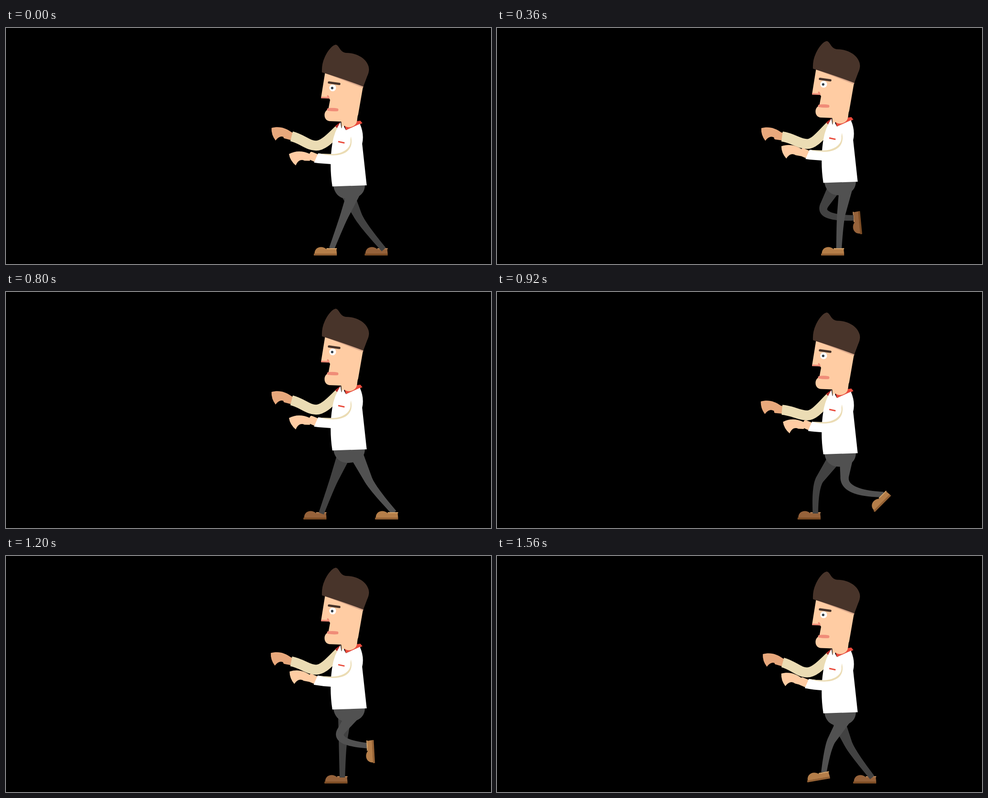
Animation, 1073 px wide and 522 px high, one loop 1.6 s. Source, as an HTML page:

```html
<!DOCTYPE html>
<html lang="en">
<head>
<meta charset="utf-8">
<title>Walking man</title>
<style>
html, body { margin: 0; width: 100%; height: 100%; overflow: hidden; background: #000; }
svg { display: block; width: 100%; height: 100%; }
</style>
</head>
<body>
<svg viewBox="0 0 1073 522">
  <defs>
    <path id="hand" d="M0,0C16,-4 30,-1 45,10L42,25L30,22C22,16 15,20 9,28Q-1,15 0,0Z"/>
    <path id="shoe" d="M-38,11.500C-38,-5 -20,-7 -12,1L10.500,1L11.500,11.500Z"/>
    <rect id="sole" x="-39.500" y="11" width="51" height="4.200"/>
    <rect id="trim" x="-11.500" y="-1" width="23" height="2.200"/>
  </defs>

  <g id="farArm" fill="#e8a87c">
    <use id="farHand" href="#hand"/>
    <rect id="farWrist" x="-17" y="-8.500" width="20" height="17" rx="3"/>
    <path id="farSleeve" fill="none" stroke="#ebdcb4" stroke-width="22"/>
  </g>

  <g id="farFoot">
    <use href="#shoe" fill="#96623a"/>
    <use href="#sole" fill="#7d4d25"/>
    <use href="#trim" fill="#b8865a"/>
  </g>
  <path id="farLeg" fill="#424242"/>

  <path id="nearLeg" fill="#515151"/>
  <g id="nearFoot">
    <use href="#shoe" fill="#b57e49"/>
    <use href="#sole" fill="#956235"/>
    <use href="#trim" fill="#d6a56c"/>
  </g>

  <g id="body">
    <path fill="#515151" d="M724,345C725,364 736,378 757,378C778,377 795,368 794,345Z"/>
    <path fill="#b5302a" d="M728,217L740,208L735,224Z"/>
    <path fill="#e94b3c" d="M748,212L752,226L783,213L788.500,210.500L784,205L776,206Z"/>
    <path fill="#ffcca3" d="M741,200L777,190Q779,211 770,216Q758,223 749,216L743,224Z"/>
    <path fill="#fff" d="M740,208L742,222L746,215L752,226L783,212Q793,235 788,256L798,348L722,350.500C717,320 717,285 722,255Q726,230 740,208Z"/>
    <path stroke="#e94b3c" stroke-width="3" d="M735,251.300L749,254.300"/>
    <path fill="#ffcca3" d="M706,98L697,154L715,156L717,159L713,180C701,184 702,205 716,206L742,207L777,203Q777,196 779,192L790,129Z"/>
    <path fill="#d9a78a" d="M706,100L790,132.500L791,127Z"/>
    <path fill="#48342a" d="M699,98Q698,80 705,65C713,47 724,37 730,37C738,39 738,53 752,55C775,55 795,66 801,82Q806,92 799,107L790.500,129.500Q750,114 699,98Z"/>
    <path fill="#f08c78" d="M697,152L711,152.500Q709,149 712,148.500Q715,150 716,156L697,155.500Z"/>
    <path fill="#f08c78" d="M712,177.500Q723,176 734,178Q737,181 734,184Q723,185 712,183Q708,180 712,177.500Z"/>
    <circle cx="722.700" cy="132.500" r="7.500" fill="#fff"/>
    <circle cx="721.600" cy="132.800" r="2.800" fill="#34404a"/>
    <path stroke="#48342a" stroke-width="5" stroke-linecap="round" d="M714.500,120.500L737.500,123.700"/>
  </g>

  <g id="nearArm">
    <use id="nearHand" href="#hand" fill="#ffcca3"/>
    <rect id="nearWrist" x="-17" y="-9" width="20" height="18" rx="4" fill="#ffcca3"/>
    <path id="nearSleeve" fill="#fff"/>
    <path id="fold" fill="#ebdcb4"/>
  </g>
</svg>
<script>
const LOOP = 1600, STEP = 800, TICK = 40;
const FAR_SHIFT = -23;

// time, knee x, knee y, foot x, foot y, foot angle
const strideKeys = [
  [0, 749, 414, 720.5, 488, 0],
  [120, 738, 413, 727.5, 488, 0],
  [280, 745, 411, 746.5, 488, 0],
  [360, 762, 409, 756.5, 488, 0],
  [560, 789, 406, 824.5, 488, 0],
  [640, 793, 409, 835, 488.5, 0],
  [760, 799, 413, 850.5, 488, 0],
  [800, 801, 414, 856, 488, 0],
  [920, 769, 408, 853, 448, -45],
  [1080, 755, 403, 828, 421.5, -82],
  [1160, 748, 390, 812, 418, -95.5],
  [1360, 722, 372, 739.5, 439.5, -61],
  [1440, 729, 379, 731, 452, -42],
  [1560, 741, 406, 723, 479, -10]
];

// time, body drop, far cuff y, near cuff x, near cuff y, near hand angle
const swayKeys = [
  [0, 0, 239.5, 686, 287.5, -13],
  [120, 8.5, 252, 692.5, 288.5, -12],
  [280, 0, 251, 690.5, 287.5, -6],
  [360, -8, 248, 687, 287.5, -4],
  [500, -15.5, 230.5, 680.5, 274, -1],
  [560, -14.5, 227.5, 679.5, 271, 0],
  [640, -9.5, 230, 682, 276.5, -2],
  [760, -2.5, 238, 685.5, 284.5, 0]
];

const el = id => document.getElementById(id);
const place = (id, x, y, angle = 0) =>
  el(id).setAttribute("transform", `translate(${x} ${y}) rotate(${angle})`);
const draw = (id, d) => el(id).setAttribute("d", d);

// Periodic cubic interpolation without overshoot
function sample(keys, period, time) {
  const t = time % period, n = keys.length;
  const key = (i, c) => {
    const turn = Math.floor(i / n);
    return keys[i - turn * n][c] + (c ? 0 : turn * period);
  };
  let i = n - 1;
  while (keys[i][0] > t) i--;
  const span = key(i + 1, 0) - key(i, 0), p = (t - key(i, 0)) / span;
  const rate = (j, c) => (key(j + 1, c) - key(j, c)) / (key(j + 1, 0) - key(j, 0));
  const slope = (j, c) => {
    const a = rate(j - 1, c), b = rate(j, c);
    return a * b <= 0 ? 0 : 2 * a * b / (a + b);
  };
  return keys[0].slice(1).map((_, k) => {
    const c = k + 1, a = key(i, c), b = key(i + 1, c), q = 1 - p;
    return a * (1 + 2 * p) * q * q + b * p * p * (3 - 2 * p)
      + span * p * q * (slope(i, c) * q - slope(i + 1, c) * p);
  });
}

// Tapered limb: straight thigh, then a shin that bends away from it
function legPath(hx, hy, kx, ky, ax, ay) {
  const thigh = Math.hypot(kx - hx, ky - hy), shin = Math.hypot(ax - kx, ay - ky);
  const ux = (kx - hx) / thigh, uy = (ky - hy) / thigh;
  const straight = (ux * (ax - kx) + uy * (ay - ky)) / shin;
  const reach = shin * (0.48 - 0.25 * straight);
  const cx = kx + ux * reach, cy = ky + uy * reach;
  const left = [], right = [];
  const add = (x, y, dx, dy, half) => {
    const len = Math.hypot(dx, dy), nx = -dy / len * half, ny = dx / len * half;
    left.push(`${(x + nx).toFixed(2)},${(y + ny).toFixed(2)}`);
    right.unshift(`${(x - nx).toFixed(2)},${(y - ny).toFixed(2)}`);
  };
  add(hx, hy, ux, uy, 15.5);
  for (let i = 0; i <= 20; i++) {
    const p = i / 20, q = 1 - p;
    add(q * q * kx + 2 * p * q * cx + p * p * ax,
        q * q * ky + 2 * p * q * cy + p * p * ay,
        q * (cx - kx) + p * (ax - cx),
        q * (cy - ky) + p * (ay - cy),
        9.4 - 3.4 * p);
  }
  return "M" + left.concat(right).join("L") + "Z";
}

function poseLeg(name, time, shift, drop, extra) {
  const [kx, ky, fx, fy, angle] = sample(strideKeys, LOOP, time);
  const lean = 0.05 * Math.max(0, fx - kx) * (1 + angle / 95);
  draw(name + "Leg", legPath(773 + shift, 355 + drop, kx + shift, ky,
    fx + shift + lean, fy + extra));
  place(name + "Foot", fx + shift, fy, angle);
}

function poseFarArm(y) {
  const lift = 252 - y, x = 630.5 + 5 * (lift / 24.5) ** 2;
  const angle = 5 + 0.77 * lift, rad = angle * Math.PI / 180;
  const low = 260 + 4.5 * Math.min(1, Math.max(0, (y - 239) / 9));
  place("farHand", x - 44.5 + (angle - 14) * 0.25, y - 18.5);
  place("farWrist", x, y, angle);
  draw("farSleeve", `M${x},${y}C${x + 25 * Math.cos(rad)},${y + 25 * Math.sin(rad)}`
    + ` 668,${low} 686,${low}S722,238 740,222`);
}

function poseNearArm(x, y, turn) {
  const hem = 301 + (y - 287) * 0.52, b = hem - 19.5;
  const tx = x + 4.5, ty = y - 10.3;
  el("nearHand").setAttribute("transform",
    `rotate(${turn} ${x} ${y}) translate(${x - 56.5} ${y - 22})`);
  place("nearWrist", x, y, 23);
  draw("nearSleeve", `M${tx},${ty}Q705,${b - 3} 724,${b - 3}L740,${b}L740,${hem}`
    + `L722,${hem}Q700,${hem - 1} ${x - 4.5},${y + 10.3}Z`);
  draw("fold", `M763,240C769,262 758,${b} 724,${b}Q705,${b - 0.5} ${tx},${ty}`
    + `Q705,${b - 3} 724,${b - 3}C748,${b - 4} 764,264 762,248Z`);
}

function render(time) {
  const [drop, farY, nearX, nearY, turn] = sample(swayKeys, STEP, time);
  for (const id of ["farArm", "body", "nearArm"]) place(id, 0, drop);
  poseFarArm(farY);
  poseNearArm(nearX, nearY, turn);
  poseLeg("far", time + STEP, FAR_SHIFT, drop, 2);
  poseLeg("near", time, 0, drop, 0);
}

function frame(now) {
  render(Math.floor(now % LOOP / TICK) * TICK);
  requestAnimationFrame(frame);
}
render(0);
requestAnimationFrame(frame);
</script>
</body>
</html>
```
